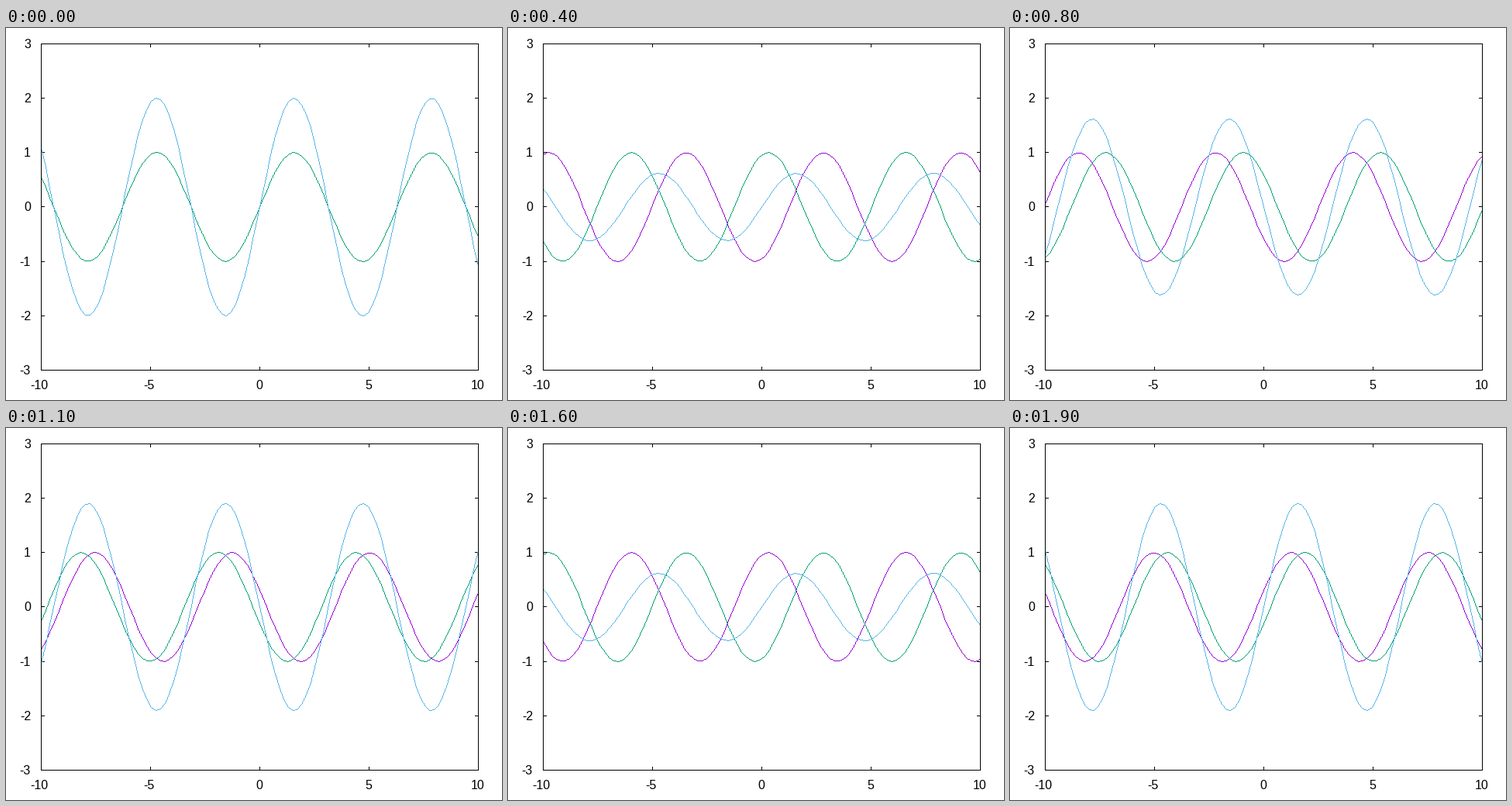
Write a matplotlib script that moves like this. It is 640 px wide and 480 px high and loops after 2 s.

```python
import numpy as np
import matplotlib.pyplot as plt
from matplotlib.animation import FuncAnimation

W, H, DPI = 640, 480, 100
FRAMES, INTERVAL = 20, 100
LEFT, RIGHT, TOP, BOTTOM = 45, 609, 20, 441
PURPLE, GREEN, BLUE = "#9400d3", "#009e73", "#56b4e9"

X = np.linspace(-10, 10, 100)


def col(x):
    return np.floor(LEFT + (np.asarray(x) + 10) * (RIGHT - LEFT) / 20 + 0.5)


def row(y):
    up = (np.round(y, 9) + 3) * (BOTTOM - TOP) / 6
    return BOTTOM - np.floor(up + 0.5)


def trace(px, py):
    """Pixels of a crisp one-pixel polyline through whole-number points."""
    xs, ys = [], []
    for x0, y0, x1, y1 in zip(px, py, px[1:], py[1:]):
        n = int(max(abs(x1 - x0), abs(y1 - y0), 1))
        t = np.arange(n + 1) / n
        xs.append(np.rint(x0 + (x1 - x0) * t))
        ys.append(np.rint(y0 + (y1 - y0) * t))
    return np.concatenate(xs), np.concatenate(ys)


fig = plt.figure(figsize=(W / DPI, H / DPI), dpi=DPI, facecolor="white")
ax = fig.add_axes([0, 0, 1, 1])
# A pixel marker fills the cell up and to the right of its point.
ax.set_xlim(0, W)
ax.set_ylim(H - 1, -1)
ax.axis("off")


def pixels(color, z, px=(), py=()):
    return ax.plot(px, py, ",", color=color, zorder=z)[0]


def segment(x0, y0, x1, y1, z=1):
    pixels("black", z, *trace([x0, x1], [y0, y1]))


def label(x, y, text, align):
    ax.text(x, y, text, ha=align, va="baseline", color="black",
            family="Liberation Sans", size=16 * 72 / DPI)


TICK = 4
for v in (-10, -5, 0, 5, 10):
    c = float(col(v))
    segment(c, BOTTOM, c, BOTTOM - TICK)
    segment(c, TOP, c, TOP + TICK)
    label(c - (2 if v < 0 else 0.5), 465, str(v), "center")
for v in range(-3, 4):
    r = float(row(v))
    segment(LEFT, r, LEFT + TICK, r)
    segment(RIGHT, r, RIGHT - TICK, r)
    label(32, r + 5, str(v), "right")

for y in (TOP, BOTTOM):
    segment(LEFT, y, RIGHT, y, 5)
for x in (LEFT, RIGHT):
    segment(x, TOP, x, BOTTOM, 5)

waves = [pixels(c, 2 + i) for i, c in enumerate((PURPLE, GREEN, BLUE))]


def update(i):
    p = 2 * np.pi * i / FRAMES
    curves = np.sin(X - p), np.sin(X + p), 2 * np.sin(X) * np.cos(p)
    for wave, y in zip(waves, curves):
        wave.set_data(*trace(col(X), row(y)))
    return waves


anim = FuncAnimation(fig, update, frames=FRAMES, interval=INTERVAL,
                     init_func=lambda: update(0), repeat=True, repeat_delay=0)
plt.show()
```
